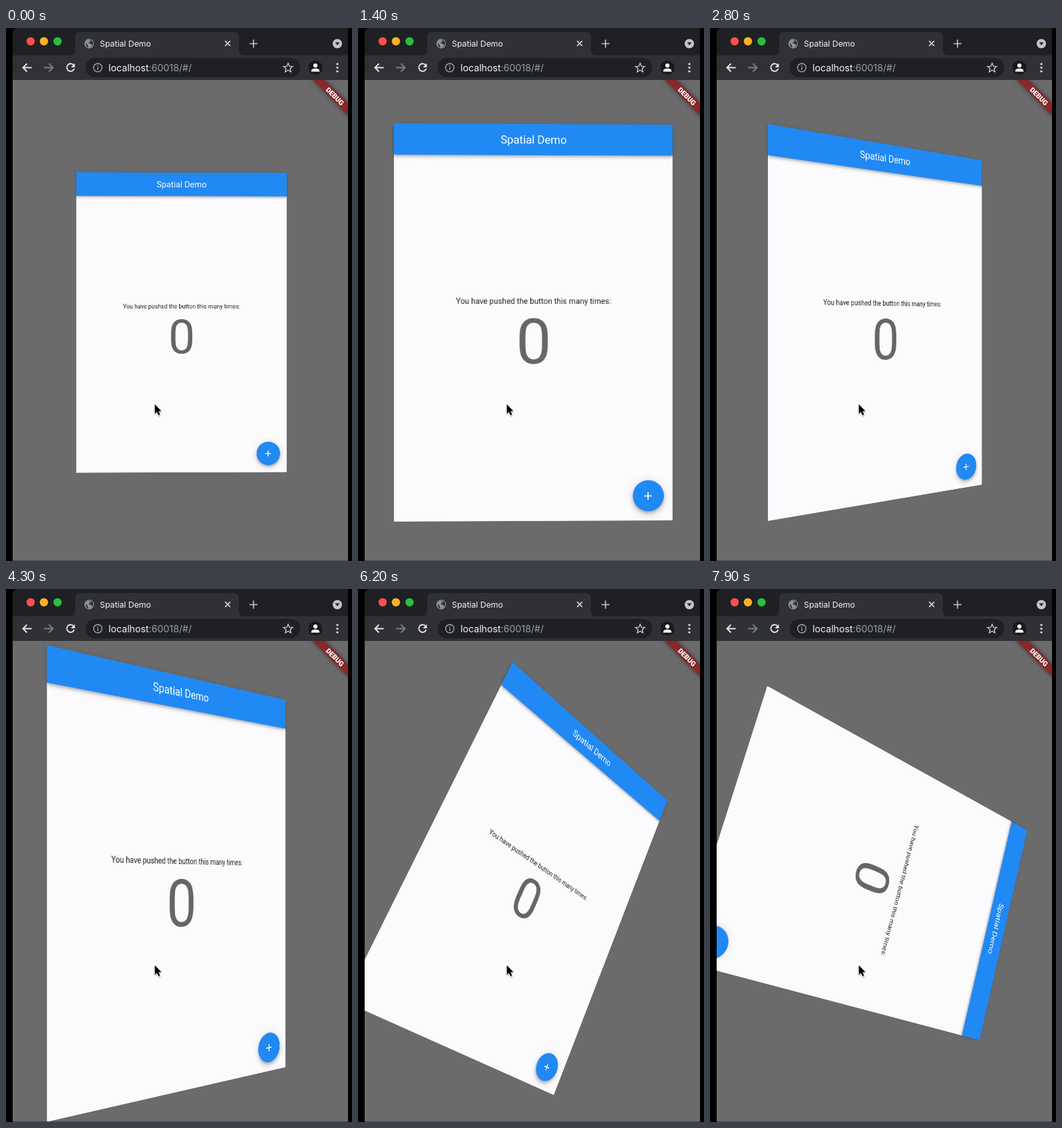
Recreate the animation shown at these times as an HTML page. Size 520 px wide and 800 px high, loop 8 s.

```html
<!DOCTYPE html>
<html lang="en">
<head>
<meta charset="utf-8">
<title>Spatial Demo</title>
<style>
html, body { margin: 0; width: 100%; height: 100%; overflow: hidden; background: #000; }
#stage { position: absolute; left: 0; top: 0; width: 520px; height: 800px; overflow: hidden; background: #000; }
#stage > svg { position: absolute; left: 0; top: 0; }
#view { position: absolute; left: 10px; top: 78px; width: 504px; height: 722px; overflow: hidden; background: #6b6b6c; }
#card {
  position: absolute; left: -1px; top: 1px; width: 510px; height: 726px;
  background: #fbfafd; font-family: Roboto, sans-serif; white-space: nowrap; text-align: center;
  will-change: transform; transform-origin: 50% 50%;
}
#card div { position: absolute; }
#bar {
  left: 0; top: 0; width: 100%; height: 57px; line-height: 58px;
  background: #2089f3; color: #fff; font-size: 20.4px;
  box-shadow: 0 2px 4px -1px rgba(0,0,0,.2), 0 4px 5px rgba(0,0,0,.14), 0 1px 10px rgba(0,0,0,.12);
}
#label { left: 0; width: 100%; top: 314px; line-height: 20px; font-size: 14.28px; color: #202022; }
#count { left: 0; width: 100%; top: 334px; line-height: 130px; font-size: 115px; color: #666668; }
#fab {
  left: 436.5px; top: 652px; width: 57px; height: 57px; border-radius: 50%; background: #2089f3;
  box-shadow: 0 3px 5px -1px rgba(0,0,0,.2), 0 6px 10px rgba(0,0,0,.14), 0 1px 18px rgba(0,0,0,.12);
}
#fab::before, #fab::after { content: ""; position: absolute; background: #fff; }
#fab::before { left: 21.5px; top: 27.5px; width: 14px; height: 2px; }
#fab::after { left: 27.5px; top: 21.5px; width: 2px; height: 14px; }
</style>
</head>
<body>
<div id="stage">
  <div id="view">
    <div id="card">
      <div id="bar">Spatial Demo</div>
      <div id="label">You have pushed the button this many times:</div>
      <div id="count">0</div>
      <div id="fab"></div>
    </div>
  </div>
  <svg width="520" height="800" viewBox="0 0 520 800" font-family="Inter, sans-serif">
    <defs>
      <filter id="soft" x="-20%" y="-100%" width="140%" height="300%"><feGaussianBlur stdDeviation="3"/></filter>
      <filter id="drop" x="-50%" y="-50%" width="200%" height="200%"><feGaussianBlur stdDeviation="1.2"/></filter>
      <clipPath id="page"><path d="M10 78H514V800H10Z"/></clipPath>
    </defs>

    <!-- debug ribbon -->
    <g clip-path="url(#page)">
      <g transform="translate(519 78) rotate(45)">
        <path d="M-41 28.5H41V40.8H-41Z" fill="#000" opacity=".55" filter="url(#soft)"/>
        <path d="M-41 28.5H41V40.8H-41Z" fill="#8a272a"/>
        <text y="38.4" text-anchor="middle" font-family="Roboto, sans-serif" font-weight="900" font-size="10.4" fill="#fff">DEBUG</text>
      </g>
    </g>
    <path d="M10 799H514V800H10Z" fill="#4b4b4c"/>

    <!-- browser frame -->
    <path d="M10 42V8Q10 0 18 0H514V42Z" fill="#1f2023"/>
    <path d="M10 41H96Q104 41 104 33V14Q104 6 112 6H342Q350 6 350 14V33Q350 41 358 41H514V78H10Z" fill="#303135"/>
    <circle cx="37" cy="20" r="6.2" fill="#fe5049"/>
    <circle cx="57" cy="20" r="6.2" fill="#fdb127"/>
    <circle cx="77.500" cy="20" r="6.2" fill="#27c03a"/>
    <circle cx="125" cy="23.500" r="7.200" fill="#8d9197"/>
    <path d="M119.500 22L122.500 25L124 29.500L121 28ZM123 18L127 17.500V20L124 22L127 24L130 25L128 28.500L131 25.500V21L128.500 18.500Z" fill="#303135"/>
    <text x="141" y="27.800" font-size="12.3" fill="#f1f3f4">Spatial Demo</text>
    <g fill="none" stroke="#e8eaed" stroke-width="1.600">
      <path d="M329.300 19.300L337 27M337 19.300L329.300 27"/>
      <path d="M372 17.500V29.500M366 23.500H378" stroke="#c8cacd"/>
      <path d="M38.500 59.500H26M31.500 53.500L25.500 59.500L31.500 65.500" stroke-width="1.800"/>
      <path d="M57.500 59.500H70M64.500 53.500L70.500 59.500L64.500 65.500" stroke="#7e8185" stroke-width="1.800"/>
      <path d="M101.800 56A5.700 5.700 0 1 0 102.500 61" stroke-width="1.800"/>
    </g>
    <path d="M103.500 53V59H97.500Z" fill="#e8eaed"/>
    <circle cx="498" cy="23.500" r="7" fill="#c3c5c8"/>
    <path d="M494.500 21.500H501.500L498 26Z" fill="#1f2023"/>
    <rect x="119.500" y="45" width="323" height="29" rx="14.500" fill="#1f2023"/>
    <circle cx="138" cy="59.500" r="6.300" fill="none" stroke="#a3a7ac" stroke-width="1.400"/>
    <path d="M137.300 58.500H138.700V63H137.300ZM137.300 55.800H138.700V57.200H137.300Z" fill="#a3a7ac"/>
    <text x="154" y="64.600" font-size="14.2" fill="#9b9fa4"><tspan fill="#f4f5f6">localhost</tspan>:60018/#/</text>
    <path id="star" fill="none" stroke="#c8cacd" stroke-width="1.400"/>
    <circle cx="465" cy="59.500" r="10.500" fill="#18191b"/>
    <circle cx="465" cy="56.300" r="3.100" fill="#fff"/>
    <path d="M458.800 65.500V64Q459.500 60.800 465 60.800T471.200 64V65.500Z" fill="#fff"/>
    <g fill="#e8eaed"><circle cx="498" cy="54" r="1.600"/><circle cx="498" cy="59.500" r="1.600"/><circle cx="498" cy="65" r="1.600"/></g>

    <!-- pointer -->
    <path d="M223.500 565.500V581L227 577.800L229.500 583H232L229.800 577H234Z" fill="#000" opacity=".4" filter="url(#drop)"/>
    <path d="M223.700 564.800V578.800L226.800 575.900L229 581L231.500 579.900L229.300 575H233.500Z" fill="#000" stroke="#fff" stroke-width="1" paint-order="stroke"/>
  </svg>
</div>
<script>
const LOOP = 8000;
const card = document.getElementById('card');

// [ms, value] keys
const zoom = [[0, .62], [650, .948], [900, .905], [1400, .821], [1850, .738], [3150, .738],
  [3600, .78], [4000, .9], [4300, .858], [4500, .82], [5000, .737]];
const yaw = [[1750, .8], [2250, 15], [2700, 30], [2800, 32.3], [3050, 36.3]];
const roll = [[5400, 0], [5800, 10], [6200, 28.3], [7200, 76.3], [7900, 108.2], [8000, 112.6]];

const slope = (a, b) => (b[1] - a[1]) / (b[0] - a[0]);

// tangent that never overshoots the keys
function tangent(keys, i) {
  if (i === 0 || i === keys.length - 1) return 0;
  const p = slope(keys[i - 1], keys[i]), q = slope(keys[i], keys[i + 1]);
  return p * q <= 0 ? 0 : 2 * p * q / (p + q);
}

function sample(keys, t) {
  const last = keys.length - 1;
  if (t <= keys[0][0]) return keys[0][1];
  if (t >= keys[last][0]) return keys[last][1];
  let i = 0;
  while (t > keys[i + 1][0]) i++;
  const a = keys[i], b = keys[i + 1], d = b[0] - a[0];
  const u = (t - a[0]) / d, v = 1 - u;
  return a[1] * v * v * (1 + 2 * u) + b[1] * u * u * (3 - 2 * u)
    + d * u * v * (v * tangent(keys, i) - u * tangent(keys, i + 1));
}

function draw(t) {
  card.style.transform = `perspective(1000px) rotateY(${sample(yaw, t)}deg) ` +
    `rotateZ(${sample(roll, t)}deg) scale(${sample(zoom, t)})`;
}

const star = Array.from({ length: 10 }, (_, i) => {
  const r = i % 2 ? 3.2 : 7.2, a = i * Math.PI / 5;
  return `${424 + r * Math.sin(a)} ${60 - r * Math.cos(a)}`;
});
document.getElementById('star').setAttribute('d', `M${star.join('L')}Z`);

const start = performance.now();
function tick() {
  draw((performance.now() - start) % LOOP);
  requestAnimationFrame(tick);
}
draw(0);
requestAnimationFrame(tick);
</script>
</body>
</html>
```
